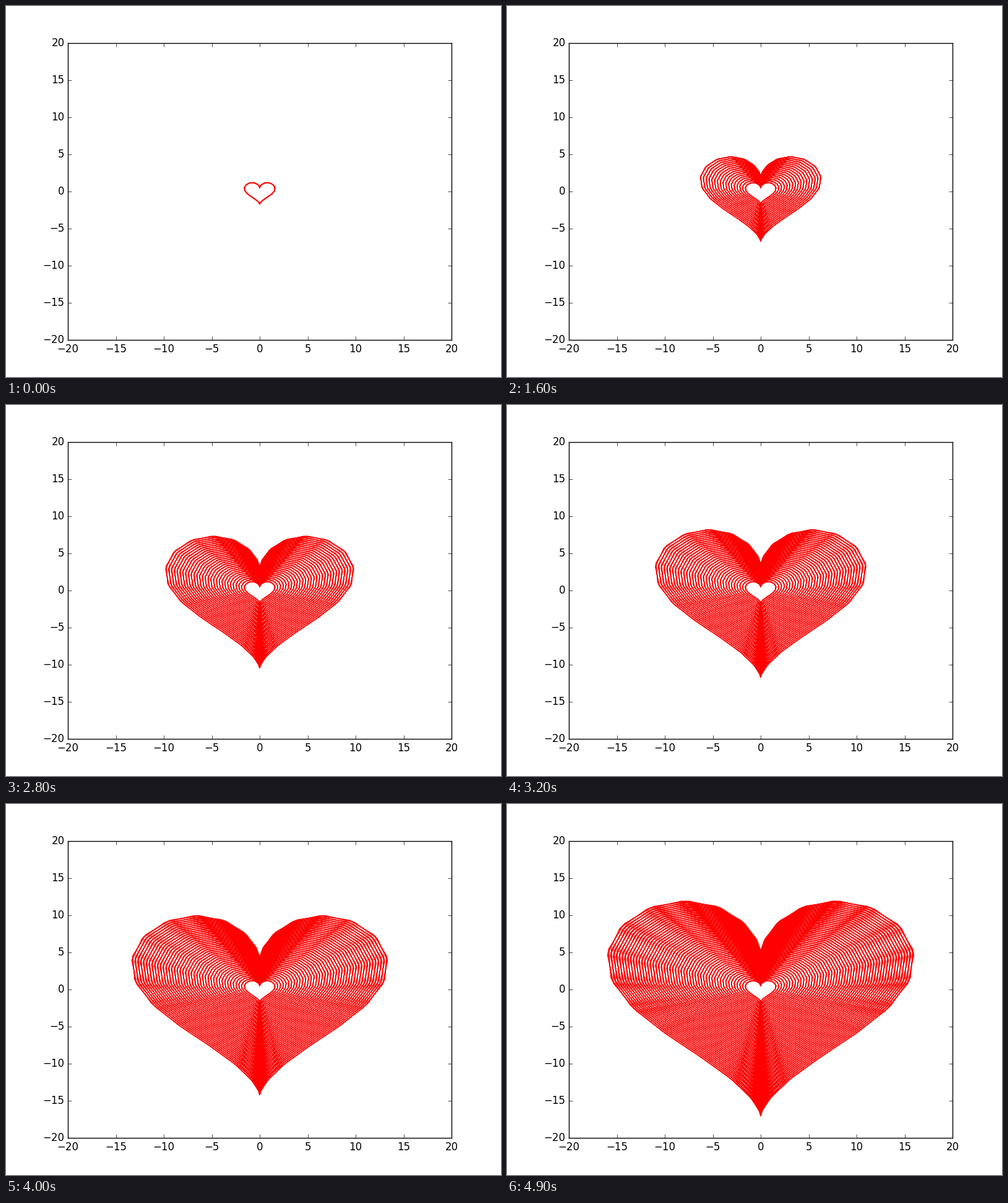
Animation, 800 px wide and 600 px high, one loop 5000 ms. Source, as a matplotlib script:

```python
import numpy as np
import matplotlib.pyplot as plt
from matplotlib.animation import FuncAnimation

FRAMES = 50
INTERVAL = 100

plt.style.use("classic")
plt.rcParams["font.family"] = "DejaVu Sans"

fig, ax = plt.subplots(figsize=(8, 6), dpi=100, facecolor="white")
ax.set_xlim(-20, 20)
ax.set_ylim(-20, 20)

# The parameter runs around the heart more than three times, so the coarse
# polygons of successive turns overlap with slightly shifted corners.
t = np.linspace(-10, 10, 100)
heart_x = 16 * np.sin(t) ** 3
heart_y = 13 * np.cos(t) - 5 * np.cos(2 * t) - 2 * np.cos(3 * t) - np.cos(4 * t)


def add_heart(scale):
    line, = ax.plot(scale * heart_x, scale * heart_y, color="red", linewidth=1)
    return line


# The innermost heart is doubled, which gives it a denser edge.
add_heart(0.1)
hearts = [add_heart(scale) for scale in np.linspace(0.1, 1, FRAMES)]


def update(frame):
    for i, heart in enumerate(hearts):
        heart.set_visible(i <= frame)
    return hearts


anim = FuncAnimation(fig, update, frames=FRAMES, interval=INTERVAL,
                     repeat=True, repeat_delay=0, blit=False)
plt.show()
```
